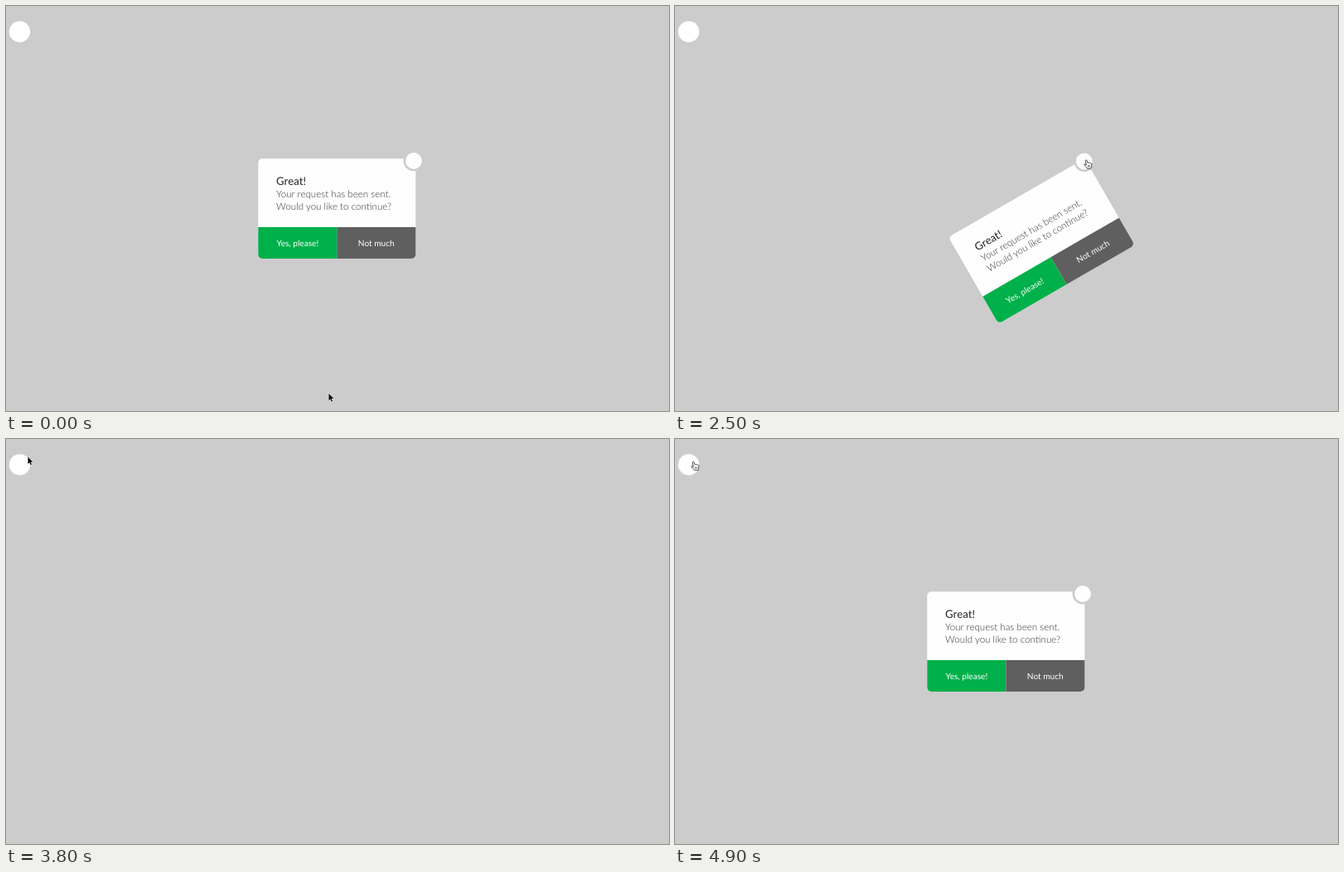
An HTML page that plays this animation: 800 px wide and 489 px high, repeating every 6.05 s.

```html
<!DOCTYPE html>
<html lang="en">
<head>
<meta charset="utf-8">
<title>Dialog dismiss</title>
<style>
  html, body { margin: 0; width: 100%; height: 100%; overflow: hidden; background: #cdcccd; }
  svg { display: block; width: 100%; height: 100%; }
  text { font-family: Lato, sans-serif; text-rendering: geometricPrecision; }
  .title { font-size: 13.2px; font-weight: 500; fill: #333; }
  .body { font-size: 11.6px; font-weight: 300; fill: #333; }
  .label { font-size: 10.15px; fill: #fff; text-anchor: middle; }
</style>
</head>
<body>
<svg viewBox="0 0 800 489">
  <defs>
    <clipPath id="rounded"><rect x="304.3" y="184.3" width="190" height="120.7" rx="5"/></clipPath>
  </defs>
  <circle cx="16.5" cy="31" r="12.7" fill="#fff"/>
  <g id="dialog">
    <g clip-path="url(#rounded)">
      <rect x="304" y="184" width="191" height="122" fill="#fefefe"/>
      <rect x="304" y="267" width="95.3" height="39" fill="#00b04a"/>
      <rect x="399.3" y="267" width="96" height="39" fill="#5f5f5f"/>
    </g>
    <text class="title" x="326.1" y="216.3">Great!</text>
    <text class="body" x="326.1" y="231">Your request has been sent.</text>
    <text class="body" x="326.1" y="245.5">Would you like to continue?</text>
    <text class="label" x="351.8" y="290">Yes, please!</text>
    <text class="label" x="446.8" y="290">Not much</text>
    <circle cx="492" cy="187" r="11.2" fill="#fefefe" stroke="#cdcccd" stroke-width="2.6"/>
  </g>
  <path id="arrow" d="M0 0V8.4L1.9 6.6L3.2 9.5L4.5 8.9L3.2 6.1H5.8Z" fill="#000" stroke="#fff" stroke-width=".7" paint-order="stroke"/>
  <path id="hand" d="M3.3 7L2.2 2.3Q2 .9 3 .9Q3.9 .9 4.2 2L4.8 4.3Q6 3.7 6.8 4.4Q8 4 8.5 4.9Q9.8 4.7 9.8 6.1L9.5 8.6L8.8 11.2H4.3L3.6 9.8L.9 7.3Q.4 6 1.7 6.1ZM5.6 7.2V9.4M7.2 7.2V9.4" fill="#fff" stroke="#222" stroke-width=".8" stroke-linejoin="round"/>
</svg>
<script>
const LOOP = 6050, STEP = 50;
const [dialog, arrow, hand] = ['dialog', 'arrow', 'hand'].map(id => document.getElementById(id));

// Cursor and entrance keys: [time, value, ...]
const cursorKeys = [
  [0, 389.5, 468], [1400, 389.5, 468], [1450, 392, 458.5], [1550, 379, 428],
  [1650, 372, 376], [1750, 389, 306], [1850, 441, 238], [1950, 491, 197],
  [2000, 503, 186], [2050, 497, 186], [3200, 497, 186], [3250, 488, 206],
  [3300, 400, 180], [3350, 250, 115], [3400, 120, 58], [3450, 50, 27],
  [3500, 28, 20], [3750, 28, 20], [3950, 22, 27], [LOOP, 22, 27]
];
const entranceKeys = [[4250, 113], [4300, 12], [4350, -25], [4400, -19], [4450, -7], [4500, 0], [LOOP, 0]];

function sample(keys, t) {
  const i = Math.max(1, keys.findIndex(key => key[0] >= t));
  const [a, b] = [keys[i - 1], keys[i]];
  const p = (t - a[0]) / (b[0] - a[0]);
  return a.slice(1).map((v, k) => v + (b[k + 1] - v) * p);
}

function place(node, x, y, visible) {
  node.setAttribute('transform', `translate(${x} ${y})`);
  node.style.display = visible ? '' : 'none';
}

function drawDialog(t) {
  const hidden = t >= 2750 && t < 4250;
  if (t >= 4250) return place(dialog, 0, sample(entranceKeys, t)[0], true);
  place(dialog, 0, 0, !hidden);
  if (t >= 2350 && !hidden) {
    // Swings on its top right corner, then drops.
    const angle = 30 * ((t - 2330) / 170) ** 1.4;
    const fall = Math.max(0, (t - 2500) / 250) ** 2;
    dialog.setAttribute('transform', `translate(${13 * fall} ${320 * fall}) rotate(${-angle} 494 184)`);
  }
}

function drawCursor(t) {
  const pointing = (t >= 2100 && t < 3250) || t >= 4000;
  const [x, y] = sample(cursorKeys, t);
  place(arrow, x, y, !pointing);
  place(hand, t >= 4000 ? 19 : 493, t >= 4000 ? 26.5 : 185, pointing);
}

function frame(now) {
  const t = Math.floor((now % LOOP) / STEP) * STEP;
  drawDialog(t);
  drawCursor(t);
  requestAnimationFrame(frame);
}
frame(0);
</script>
</body>
</html>
```
